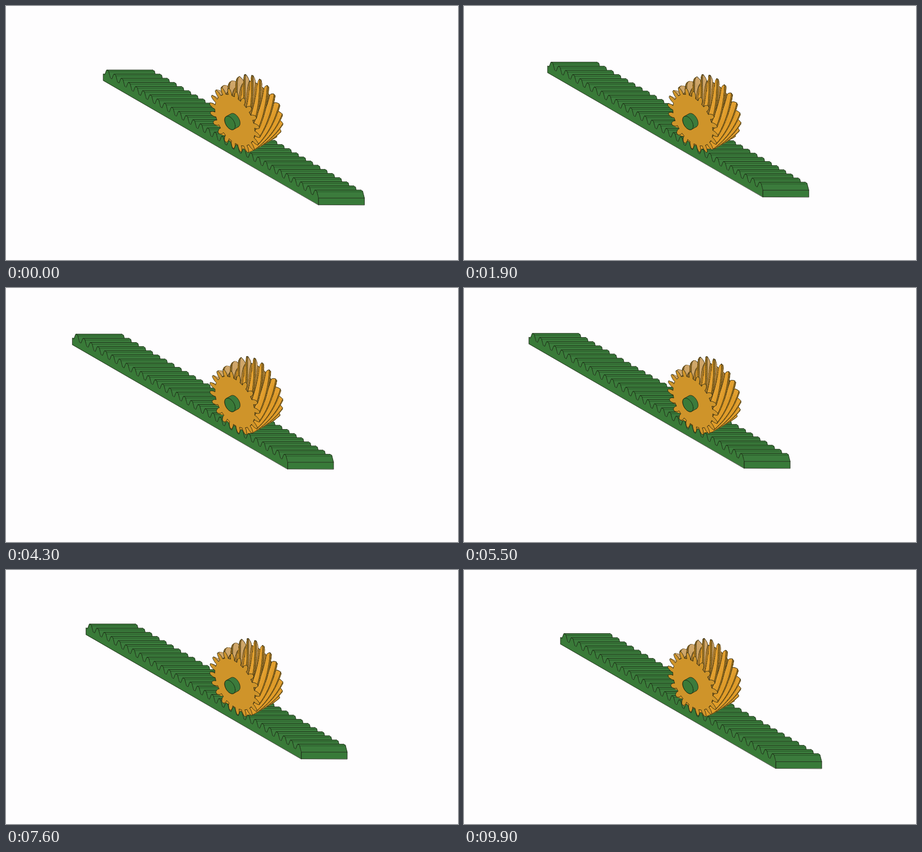
These frames come from a looping animation (800 px wide and 450 px high, 10 s). An HTML page with a canvas:

```html
<!DOCTYPE html>
<html>
<head>
<meta charset="utf-8">
<title>Helical rack and pinion</title>
<style>
  html, body { margin: 0; width: 100%; height: 100%; overflow: hidden; background: #fefdfe; }
  canvas { display: block; }
</style>
</head>
<body>
<canvas id="stage" width="800" height="450"></canvas>
<script>
const ctx = document.getElementById('stage').getContext('2d');
ctx.lineJoin = ctx.lineCap = 'round';

const TEETH = 20, RACK_TEETH = 30, SLABS = 14;
const R = 46.7, WIDTH = 46.9, BASE = 12;            // pitch radius, face width, rack base
const M = 2 * R / TEETH, PITCH = Math.PI * M;
const ROOT_R = R - 1.25 * M, TIP_R = R + M, ROOT_Z = -R - 1.25 * M;
const RACK_X = -269, GAP_X = -3.39;                 // rack start, gap nearest below the axis
const INK = '#14180c', SOFT = '#204a20';
const GREEN = { tip: '#3f8040', flank: '#3b7b3c', front: '#397a38', end: '#387a39' };
const GOLD = { face: '#cf942a', tip: '#e4a02a', lit: '#e19d2a', back: '#cda364', root: '#a37426' };

// Isometric projection: x runs down-right, y up-right, z up
const iso = (x, y, z) => [405 + .866 * (x + y), 202.2 + .5 * (x - y) - z];
const polar = (r, a, y) => iso(r * Math.cos(a), y, r * Math.sin(a));

function poly(points, fill, stroke = INK, width = .75) {
  ctx.beginPath();
  points.forEach(p => ctx.lineTo(...p));
  ctx.closePath();
  ctx.fillStyle = fill;
  ctx.fill();
  ctx.strokeStyle = stroke;
  ctx.lineWidth = width;
  ctx.stroke();
}

function edge(p, q, colour = INK) {
  ctx.beginPath();
  ctx.moveTo(...p);
  ctx.lineTo(...q);
  ctx.strokeStyle = colour;
  ctx.lineWidth = .75;
  ctx.stroke();
}

// Pinion outline: involute teeth as [radius, angle], counter-clockwise
const PRESSURE = 20 * Math.PI / 180, BASE_R = R * Math.cos(PRESSURE);
const inv = a => Math.tan(a) - a;
const half = r => Math.PI / TEETH / 2 + inv(PRESSURE) - (r > BASE_R ? inv(Math.acos(BASE_R / r)) : 0);
const rise = [ROOT_R, 44, 46.5, 49, 50.7, TIP_R].map(r => [r, half(r) * (r === TIP_R ? .75 : 1)]);
const toothShape = [...rise.map(([r, h]) => [r, -h]), ...rise.slice().reverse()];
const SIDE = toothShape.length;
const outline = [];
for (let k = 0; k < TEETH; k++)
  for (const [r, h] of toothShape) outline.push([r, h + k * 2 * Math.PI / TEETH]);

const crease = i => [0, 5, 6, 11].includes(i % SIDE);
function goldOf(i) {
  const j = i % SIDE;
  return j < 5 ? GOLD.back : j === 5 ? GOLD.tip : j < 11 ? GOLD.lit : GOLD.root;
}

// The helix runs at 45 degrees on the tip cylinder
const twist = y => y / TIP_R;
const section = (turn, y) => outline.map(([r, a]) => polar(r, a + turn + twist(y), y));

function slab(turn, k) {
  const yNear = WIDTH * k / SLABS, yFar = WIDTH * (k + 1) / SLABS;
  const near = section(turn, yNear), far = section(turn, yFar), n = near.length;
  const faces = near.map((d, i) => {
    const j = (i + 1) % n, a = far[i], b = far[j], c = near[j];
    const seen = (c[0] - a[0]) * (d[1] - b[1]) - (c[1] - a[1]) * (d[0] - b[0]) < 0;
    const [r, angle] = outline[i], t = angle + turn + twist(yNear);
    return { i, j, a, b, c, d, seen, depth: r * (Math.cos(t) + Math.sin(t)) };
  });
  const visible = faces.filter(f => f.seen).sort((f, g) => f.depth - g.depth);
  for (const { i, j, a, b, c, d } of visible) {
    const colour = goldOf(i);
    poly([a, b, c, d], colour, colour, .5);
    if (crease(i) || !faces[(i + n - 1) % n].seen) edge(a, d);
    if (crease(j) || !faces[j].seen) edge(b, c);
    if (k === SLABS - 1) edge(a, b);
  }
}

// One rack pitch as [x, height]: root land, back flank, tip, front flank
const LAND = 3.1, DEPTH = 2.25 * M;
const rackShape = [[0, 0], [LAND, 0], [6.6, DEPTH - 1], [7.3, DEPTH], [10.5, DEPTH], [11.3, DEPTH - 1], [PITCH, 0]];

function rackTooth(x0) {
  const front = rackShape.map(([x, h]) => iso(x0 + x, 0, ROOT_Z + h));
  const back = rackShape.map(([x, h]) => iso(x0 + x + WIDTH, WIDTH, ROOT_Z + h));
  for (let i = 0; i < front.length - 1; i++) {
    const colour = i === 3 ? GREEN.tip : GREEN.flank;
    poly([front[i], back[i], back[i + 1], front[i + 1]], colour, colour, .4);
    edge(back[i], back[i + 1]);
  }
  edge(front[3], back[3]);
  edge(front[5], back[5], SOFT);
}

function rackFront(x0) {
  const x1 = x0 + RACK_TEETH * PITCH, low = ROOT_Z - BASE;
  const side = [iso(x0, 0, low)];
  for (let k = 0; k < RACK_TEETH; k++)
    for (const [x, h] of rackShape) side.push(iso(x0 + k * PITCH + x, 0, ROOT_Z + h));
  side.push(iso(x1, 0, low));
  poly(side, GREEN.front);
  poly([iso(x1, 0, low), iso(x1, 0, ROOT_Z), iso(x1 + WIDTH, WIDTH, ROOT_Z), iso(x1 + WIDTH, WIDTH, low)], GREEN.end);
}

function shaft() {
  const radius = 10.8, out = -10;
  const arc = (from, to, y) => Array.from({ length: 33 }, (_, i) =>
    polar(radius, (from + (to - from) * i / 32) * Math.PI / 180, y));
  poly([...arc(-45, 135, 0), ...arc(135, 315, out)], GREEN.flank);
  poly(arc(0, 360, out), GREEN.front);
}

function draw(time) {
  const travel = -5 * PITCH * (1 - Math.abs(time / 5000 - 1));
  const turn = -Math.PI / 2 + (GAP_X + travel) / R;
  const x0 = RACK_X + travel;
  const starts = Array.from({ length: RACK_TEETH }, (_, k) => x0 + k * PITCH);
  const isNear = x => x + 9 > 20;

  ctx.fillStyle = '#fefdfe';
  ctx.fillRect(0, 0, 800, 450);
  starts.filter(x => !isNear(x)).forEach(rackTooth);
  for (let k = SLABS - 1; k >= 0; k--) slab(turn, k);
  starts.filter(isNear).forEach(rackTooth);
  poly(section(turn, 0), GOLD.face);
  rackFront(x0);
  shaft();
}

let shown = -1;
function tick() {
  const step = Math.floor(performance.now() % 10000 / 100);
  if (step !== shown) draw((shown = step) * 100);
  requestAnimationFrame(tick);
}
tick();
</script>
</body>
</html>
```
